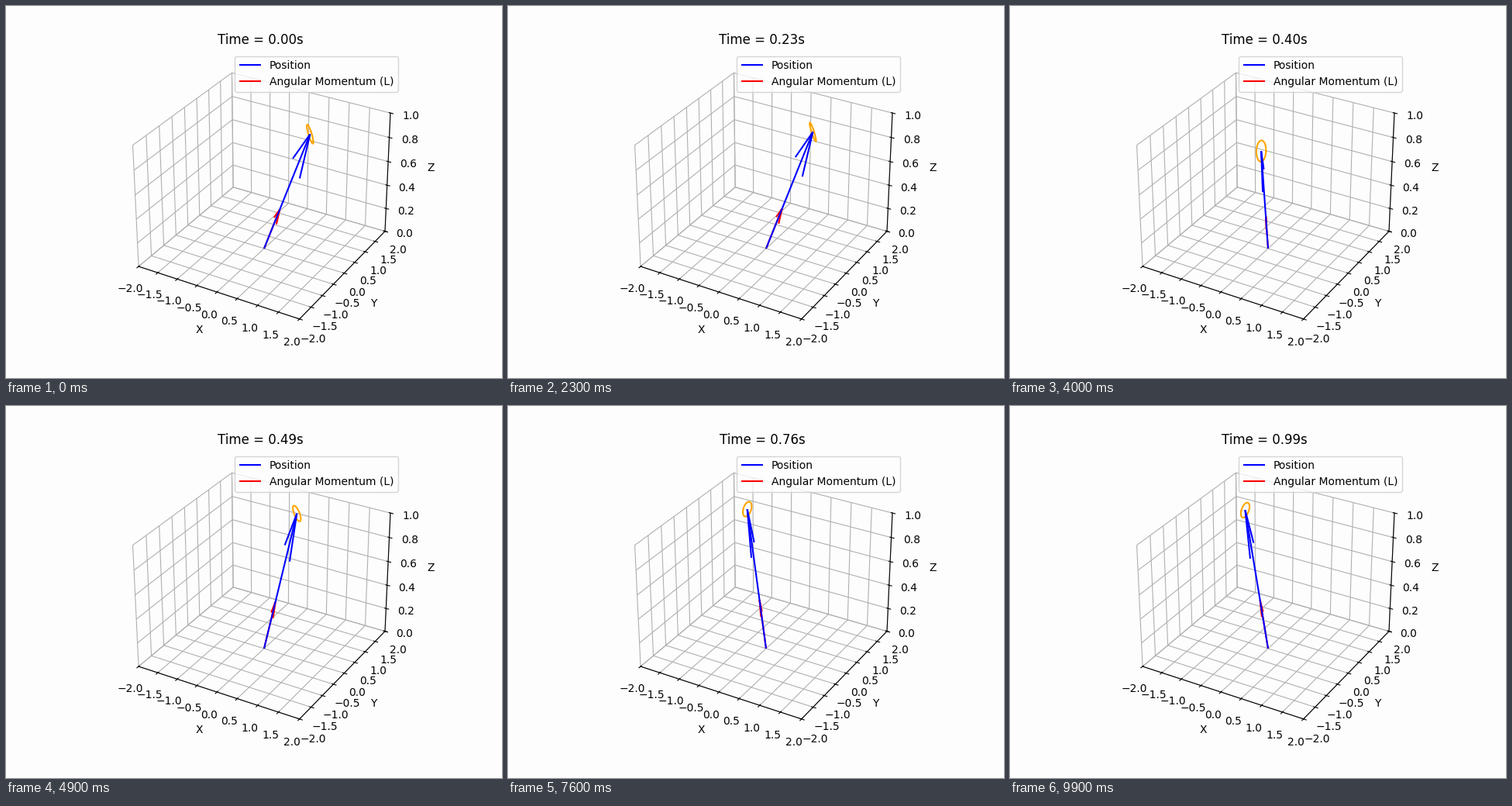
A matplotlib script for the animation above (10 s loop, 640 by 480 pixels).

```python
import numpy as np
import matplotlib.pyplot as plt
from matplotlib.animation import FuncAnimation

FRAMES, INTERVAL = 100, 100
DT = 0.01
GRAVITY = 9.81
SPIN_L = 0.5          # magnitude of the angular momentum
DISC_RADIUS = 0.1
PAPER = "#fdfdfd"

# Torque m*g*r over the horizontal part of L, for a top tilted by 45 degrees
PRECESSION = GRAVITY / (SPIN_L * np.sin(np.pi / 4))

plt.rcParams.update({
    "figure.facecolor": PAPER,
    "axes.facecolor": PAPER,
    "axes3d.xaxis.panecolor": PAPER,
    "axes3d.yaxis.panecolor": PAPER,
    "axes3d.zaxis.panecolor": PAPER,
})

fig = plt.figure(figsize=(6.4, 4.8), dpi=100)
ax = fig.add_subplot(projection="3d")
ax.set(xlim=(-2, 2), ylim=(-2, 2), zlim=(0, 1),
       xlabel="X", ylabel="Y", zlabel="Z")
title = ax.set_title("")
disc, = ax.plot([], [], [], color="orange")
turn = np.linspace(0, 2 * np.pi, 100)
arrows = []


def top_state(phi):
    """Tip of the top, its angular momentum and the rim of its disc."""
    c, s = np.cos(phi), np.sin(phi)
    tip = np.array([c, s, 1.0])
    axis = tip / np.sqrt(2)
    side = np.array([-s, c, 0.0])
    up = np.cross(axis, side)
    rim = tip[:, None] + DISC_RADIUS * (
        np.outer(side, np.cos(turn)) + np.outer(up, np.sin(turn)))
    return tip, SPIN_L * axis, rim


def update(i):
    tip, momentum, rim = top_state(PRECESSION * DT * (i + 1))
    while arrows:
        arrows.pop().remove()
    arrows.append(ax.quiver(0, 0, 0, *tip, color="blue", label="Position"))
    arrows.append(ax.quiver(0, 0, 0, *momentum, color="red",
                            label="Angular Momentum (L)"))
    disc.set_data_3d(*rim)
    title.set_text(f"Time = {i * DT:.2f}s")
    return [*arrows, disc, title]


update(0)
ax.legend(loc="upper right")

anim = FuncAnimation(fig, update, frames=FRAMES, interval=INTERVAL,
                     init_func=lambda: update(0), repeat=True, repeat_delay=0)
plt.show()
```
